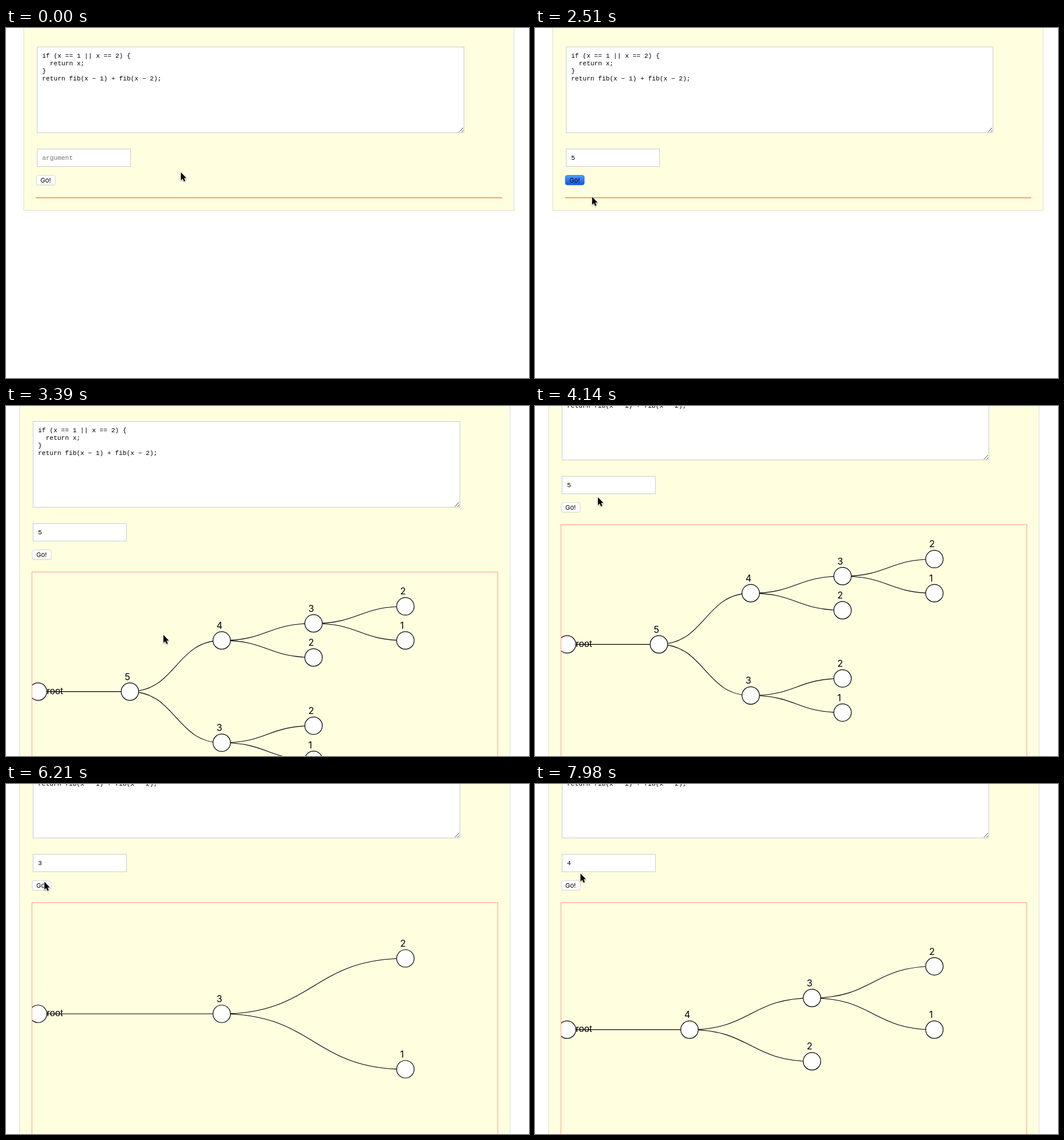
Recreate the animation shown at these times as an HTML page. Size 897 px wide and 600 px high, loop 8 s.

```html
<!DOCTYPE html>
<html lang="en">
<head>
<meta charset="utf-8">
<title>Recursion tree</title>
<style>
  html, body { margin: 0; width: 100%; height: 100%; overflow: hidden; background: #fff; }
  svg { display: block; }
  .mono { font: 11px "Liberation Mono", monospace; }
  .ui { font: 11px Inter, sans-serif; }
  .num { font: 16px Inter, sans-serif; }
  .root { font: 16px "Liberation Sans", sans-serif; }
  .box { fill: #fff; stroke: #ccc; }
  .node { fill: #fff; stroke: #000; stroke-width: 1.2; }
  .link { fill: none; stroke: #000; stroke-width: 1.1; }
  #arrow, #beam { filter: drop-shadow(0 1px 1px #0005); }
</style>
</head>
<body>
<svg width="897" height="600">
  <defs>
    <linearGradient id="blue" x2="0" y2="1">
      <stop stop-color="#559bff"/><stop offset="1" stop-color="#0a55e4"/>
    </linearGradient>
    <clipPath id="clip"><rect x="52" y="291" width="798" height="500"/></clipPath>
    <rect id="focus" x="52.5" y="206.5" width="162" height="32" rx="1.5"/>
    <path id="caret" d="M-3-7.5Q0-7.5 0-5.5Q0-7.5 3-7.5M0-6V6M-3 7.5Q0 7.5 0 5.5Q0 7.5 3 7.5M-2 1.5H2"/>
  </defs>
  <g id="page">
    <rect id="panel" x="30.5" y="-20.5" width="841" fill="#ffffe0" stroke="#bbb" stroke-dasharray="1 1"/>
    <rect class="box" x="53.5" y="32.5" width="732" height="147"/>
    <path d="M777 178.5l7-7.5M781.5 178.5l3-3" stroke="#444"/>
    <g class="mono">
      <text x="62" y="51">if (x == 1 || x == 2) {</text>
      <text x="75.2" y="64">return x;</text>
      <text x="62" y="77">}</text>
      <text x="62" y="90">return fib(x − 1) + fib(x − 2);</text>
    </g>
    <rect class="box" x="53.5" y="207.5" width="160" height="30"/>
    <g id="ring" fill="none" stroke="#5f9df3">
      <use href="#focus" stroke-width="5" opacity=".25"/>
      <use href="#focus" stroke-width="3"/>
    </g>
    <rect id="selection" x="62" y="216" width="6.6" height="13" fill="#a9cdf7"/>
    <text id="value" class="mono" x="62" y="226"></text>
    <rect x="51.5" y="253" width="33.5" height="17.3" rx="4" fill="#0001"/>
    <rect id="button" x="52" y="252.5" width="32.5" height="16.5" rx="3.5" stroke-width=".8"/>
    <text class="ui" x="59" y="265">Go!</text>
    <rect id="frame" x="51.5" y="290.5" width="799" fill="none" stroke="#ffa07a"/>
    <g id="tree" clip-path="url(#clip)"></g>
  </g>
  <path id="arrow" d="M0 .5V14L3 11.2 5.2 16 7.5 15 5.4 10.3H9.4Z" stroke="#fff" stroke-width="1.3" paint-order="stroke"/>
  <g id="beam" fill="none">
    <use href="#caret" stroke="#fff" stroke-width="2.4"/>
    <use href="#caret" stroke="#000" stroke-width="1.1"/>
  </g>
</svg>
<script>
const $ = id => document.getElementById(id);
const LOOP = 8000, TICK = 147.8;

// Tidy tree layout: distance from a call to each child, in leaf units,
// and how far its subtree reaches above and below it.
const spread = n => n > 4 ? 1.5 : n > 2 ? 0.5 : 0;
const above = n => spread(n) && spread(n) + above(n - 1);
const below = n => spread(n) && spread(n) + below(n - 2);

function drawTree(n) {
  if (!n) return "";
  const margin = n > 3 ? 1 : 0.5;
  const unit = 380 / (above(n) + below(n) + 2 * margin);
  const rootX = 62, rootY = 291 + (above(n) + margin) * unit, step = 630 / (n - 1);
  let links = "", nodes = "";
  const link = (x0, y0, x1, y1) => {
    const mid = (x0 + x1) / 2;
    links += `<path class="link" d="M${x0} ${y0}C${mid} ${y0} ${mid} ${y1} ${x1} ${y1}"/>`;
  };
  const node = (x, y, name, dx, dy, label) => {
    nodes += `<circle class="node" cx="${x}" cy="${y}" r="15"/>
      <text class="${name}" x="${x + dx}" y="${y + dy}">${label}</text>`;
  };
  const call = (k, x, y, parentX, parentY) => {
    link(parentX, parentY, x, y);
    node(x, y, "num", -9, -20, k);
    if (k <= 2) return;
    call(k - 1, x + step, y - spread(k) * unit, x, y);
    call(k - 2, x + step, y + spread(k) * unit, x, y);
  };
  node(rootX, rootY, "root", 15, 4, "root");
  call(n, rootX + step, rootY, rootX, rootY);
  return links + nodes;
}

// Each run of the form; the moments are counted in ticks.
const runs = [
  { n: 5, focus: 8, select: 10, type: 10, press: 15, done: 18 },
  { n: 3, focus: 34, select: 35, type: 38, press: 39, done: 40 },
  { n: 4, focus: 45, select: 46, type: 50, press: 53, done: 54 },
];

// Pointer strokes: [first tick, last tick, end x, end y]
const strokes = [
  [0, 0, 300, 247], [2, 5, 149, 237], [6, 8, 118, 225], [10, 12, 72, 264],
  [15, 17, 98, 289], [17, 21, 270, 392], [25, 28, 108, 156], [28, 30, 101, 149],
  [32, 36, 14, 148], [36, 37, 55, 157], [37, 40, 62, 176], [41, 48, 79.5, 136],
  [50, 52, 64, 171], [53, 54, 78, 153],
];

function pointerAt(tick) {
  let x = 0, y = 0;
  for (const [from, to, endX, endY] of strokes) {
    if (tick < from) break;
    const p = Math.min(1, (tick - from) / (to - from || 1)) || +(from === to);
    const ease = Math.sin(p * Math.PI / 2);
    x += (endX - x) * ease;
    y += (endY - y) * ease;
  }
  return { x, y };
}

const set = (id, attrs) => { for (const k in attrs) $(id).setAttribute(k, attrs[k]); };
const show = (id, on) => $(id).style.display = on ? "" : "none";

function render(tick) {
  const during = (start, end) => runs.some(r => tick >= r[start] && tick < r[end]);
  const latest = moment => runs.findLast(r => tick >= r[moment])?.n;
  const value = latest("type"), tree = latest("done"), pressed = during("press", "done");
  const dx = tree ? -7 : 0, dy = tick < 23 ? 0 : tick < 24 ? -6 : -87;
  const { x, y } = pointerAt(tick);
  const overInput = x - dx > 53 && x - dx < 214 && y - dy > 207 && y - dy < 238;

  set("page", { transform: `translate(${dx} ${dy})` });
  set("panel", { height: tree ? 800 : 333 });
  set("frame", { height: tree ? 500 : 1 });
  $("tree").innerHTML = drawTree(tree);
  $("value").textContent = value || "argument";
  set("value", { fill: value ? "#000" : "#777" });
  set("button", { fill: pressed ? "url(#blue)" : "#fff", stroke: pressed ? "#2a6fe8" : "#d0d0d0" });
  show("ring", during("focus", "press"));
  show("selection", during("select", "type"));
  show("arrow", !overInput);
  show("beam", overInput);
  set(overInput ? "beam" : "arrow", { transform: `translate(${x} ${y})` });
}

let current;
function frame() {
  const tick = Math.floor((performance.now() % LOOP + 10) / TICK);
  if (tick !== current) render(current = tick);
  requestAnimationFrame(frame);
}
frame();
</script>
</body>
</html>
```
